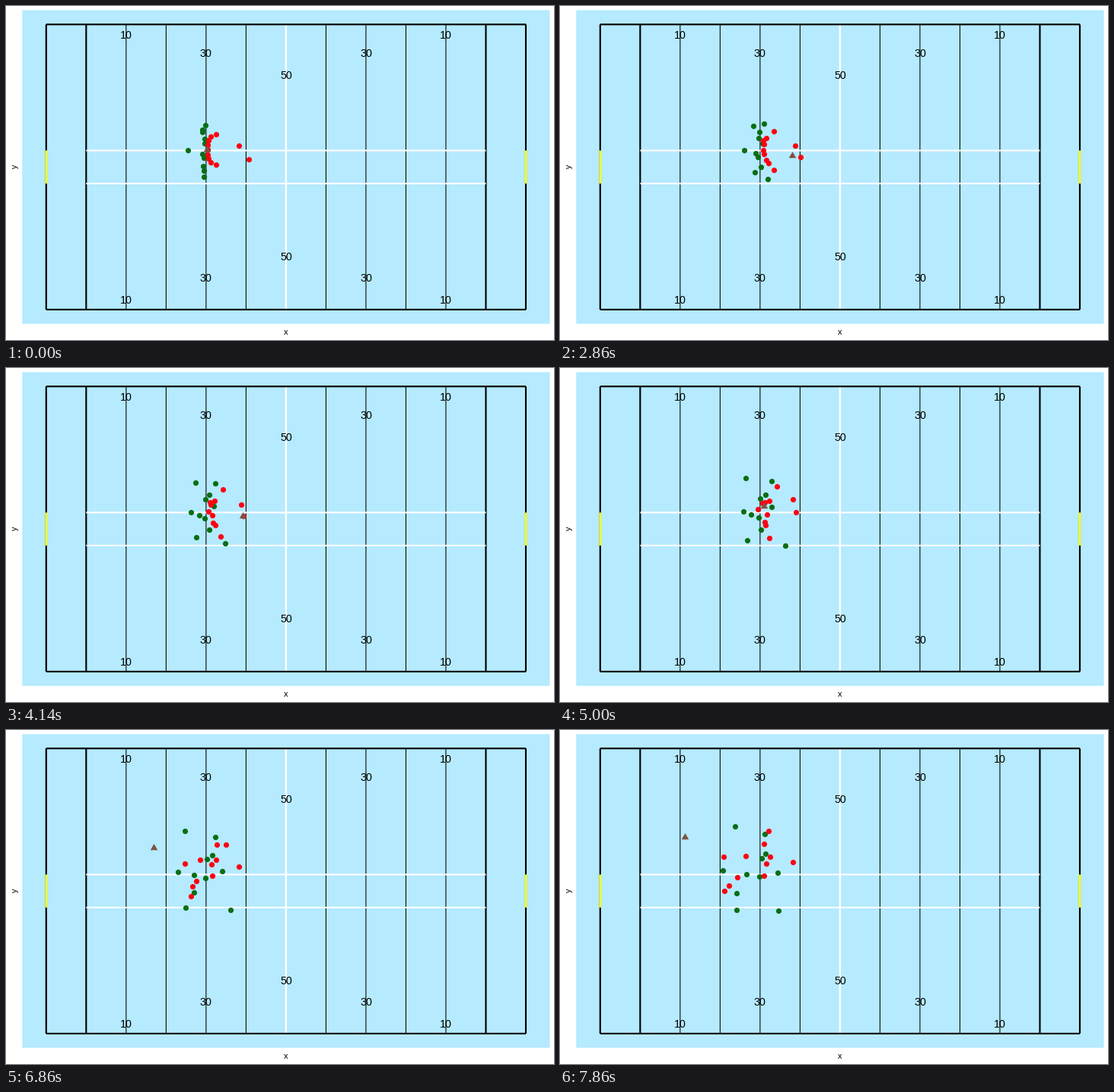
A matplotlib script for the animation above (8000 ms loop, 720x440 px).

```python
import numpy as np
import matplotlib.pyplot as plt
from matplotlib.animation import FuncAnimation

W, H, DPI = 720, 440, 100
FRAMES, LOOP = 56, 8000
PX = 72 / DPI  # points per pixel

SKY, BLACK, WHITE = "#b5eaff", "#000000", "#ffffff"
GREEN, RED, BROWN, YELLOW = "#0a6e14", "#fc0013", "#7d5240", "#ffff00"

# The panel sits inside plot margins; the field is inset 1/22 of it.
LEFT, TOP, RIGHT, BOTTOM = 21.3, 5.5, W - 5.5, H - 21.3
PAD_X, PAD_Y = (RIGHT - LEFT) / 22, (BOTTOM - TOP) / 22
FIELD_TOP, FIELD_BOTTOM = TOP + PAD_Y, BOTTOM - PAD_Y
STROKE = 2.13

SNAP, CATCH, RELEASE, LAST = 15, 21, 29, FRAMES - 1
TURN = 0.65  # share of the play run at the turning point
SPOT = np.array([263.6, 188.7])


def line_up(n):
    """Place of the n-th blocker, counted from the centre of the line."""
    return (264.5 + 0.6 * abs(n) + 0.036 * n ** 4,
            189.2 + 6.5 * n - 0.09 * n ** 3)


# Each player: start, turning point if the run bends, end.
DEFENCE = [
    [(262, 157), (278, 145.5), (269, 137)],
    [(257.7, 163), (229.8, 127)],
    [(258.2, 165.8), (271.3, 166), (269.8, 163.5)],
    [(260.5, 174.8), (265.3, 169)],
    [(261, 181), (281, 184.3), (286.2, 188)],
    [(238.9, 189.8), (235.7, 188.5), (213.5, 185)],
    [(258.2, 195), (244.7, 190.5)],
    [(259.8, 199.6), (262, 193.5)],
    [(259, 210.8), (258.3, 214), (231.7, 214.7)],
    [(259.6, 216.6), (231.5, 237.3)],
    [(260, 225.1), (298, 235.6), (287.3, 238.4)],
]

OFFENCE = [
    [line_up(-4), (282.5, 153.6), (268, 149.6)],
    [line_up(-3), (275.8, 173.5), (276, 167.4)],
    [line_up(-2), (271, 176.5)],
    [line_up(-1), (262.3, 174.9), (244.3, 166.1)],
    [line_up(0), (250.6, 182), (215.4, 167.2)],
    [line_up(1), (271.8, 192.6), (268, 192)],
    [line_up(2), (262.3, 201.5), (233.1, 194.5)],
    [line_up(3), (261, 207), (222.4, 205)],
    [line_up(4), (263.7, 223.1), (216, 212)],
    [(306.3, 184), (299.5, 164.4), (274.1, 133.5)],
]
PASSER = [(319.2, 202), (307.9, 185.8), (305.7, 174.4)]
OFFENCE.append(PASSER)


def run(points, f):
    """Constant acceleration from the start through the turn to the end."""
    p = np.array(points, float)
    u = max(f - SNAP, 0) / (LAST - SNAP)
    move = p[-1] - p[0]
    bend = 0
    if len(p) == 3:
        bend = (p[1] - p[0] - TURN * move) / (TURN * (1 - TURN))
    return p[0] + move * u + bend * u * (1 - u)


def ball_at(f):
    """Snapped to the passer, carried, then thrown with some drag."""
    if f <= RELEASE:
        u = np.clip((f - SNAP - 1) / (CATCH - SNAP - 1), 0, 1)
        return SPOT + (run(PASSER, f) - (1, 0) - SPOT) * u
    hand = ball_at(RELEASE)
    u = (f - RELEASE) / (LAST - RELEASE)
    return hand + (np.array([164.1, 140.7]) - hand) * (1.35 * u - 0.35 * u * u, u)


def yard(n):
    """Pixel column of a yard counted from the left back line."""
    return LEFT + PAD_X + (RIGHT - LEFT - 2 * PAD_X) * n / 120


fig = plt.figure(figsize=(W / DPI, H / DPI), dpi=DPI, facecolor=WHITE)
ax = fig.add_axes([0, 0, 1, 1])
ax.set(xlim=(0, W), ylim=(H, 0))
ax.axis("off")


def line(xs, ys, color, width, z):
    ax.plot(xs, ys, color=color, lw=width * PX, zorder=z,
            solid_capstyle="butt", snap=False)


def label(x, y, text, size, **kw):
    ax.text(x, y, text, size=size * PX, family="Liberation Sans", color=BLACK,
            ha="center", zorder=5, **kw)


def draw_field():
    ax.add_patch(plt.Rectangle((LEFT, TOP), RIGHT - LEFT, BOTTOM - TOP,
                               fc=SKY, lw=0, zorder=0, snap=False))
    ends = [FIELD_TOP, FIELD_BOTTOM]
    hashes = [190.4, 233.9]
    for n in range(20, 110, 10):
        if n != 60:
            line([yard(n)] * 2, ends, BLACK, STROKE / 2, 1)
    line([yard(60)] * 2, ends, WHITE, 2.4, 2)
    for n in (0, 10, 110, 120):
        line([yard(n)] * 2, ends, BLACK, STROKE, 3)
    for y in ends:
        line([yard(0), yard(120)], [y, y], BLACK, STROKE, 3)
    for y in hashes:
        line([yard(10), yard(110)], [y, y], WHITE, STROKE, 4)
    for n in (0, 120):
        line([yard(n)] * 2, hashes, YELLOW, 2.6, 4)

    for text, n, high, low in (("10", 20, 43.2, 392.2), ("30", 40, 67.2, 363.2),
                               ("50", 60, 96.2, 335.2)):
        for x in {yard(n), yard(120 - n)}:
            for y in (high, low):
                label(x, y, text, 14.3, va="baseline")
    label(yard(60), 433, "x", 11, va="baseline")
    label(11.5, 211.5, "y", 11, va="center", rotation=90)


def markers(color, size, shape, z):
    return ax.scatter([], [], s=(size * PX) ** 2, c=color, marker=shape,
                      linewidths=0, zorder=z)


draw_field()
green = markers(GREEN, 7.2, "o", 6)
red = markers(RED, 7.2, "o", 7)
ball = markers(BROWN, 11, (3, 0, 0), 8)


def update(f):
    green.set_offsets([run(p, f) for p in DEFENCE])
    red.set_offsets([run(p, f) for p in OFFENCE])
    ball.set_offsets([ball_at(f)])
    return green, red, ball


anim = FuncAnimation(fig, update, frames=FRAMES, init_func=lambda: update(0),
                     interval=LOOP / FRAMES, repeat=True, repeat_delay=0)
plt.show()
```
